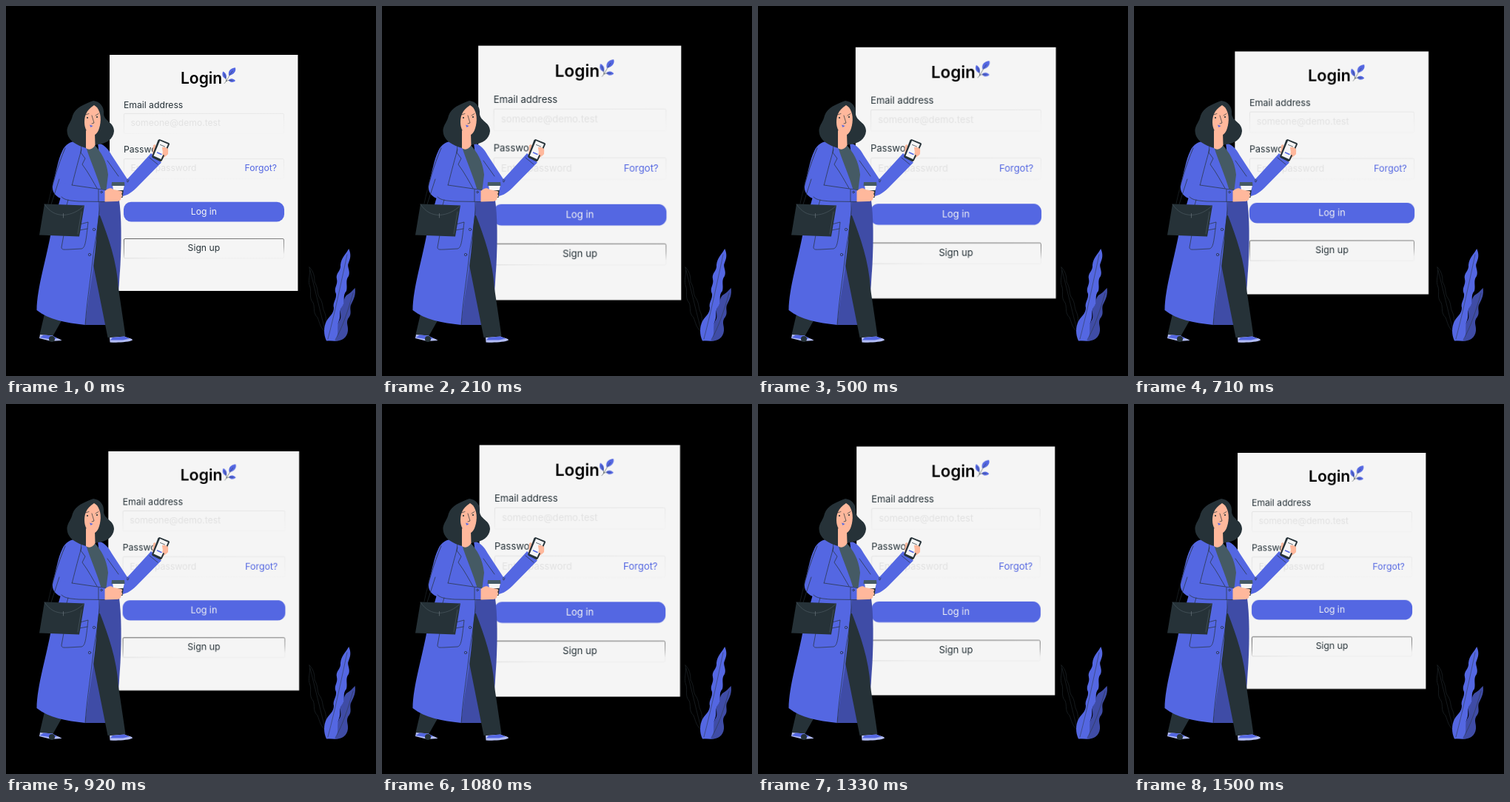
An HTML page for the animation above (1540 ms loop, 500 by 500 pixels).

```html
<!DOCTYPE html>
<html lang="en">
<head>
<meta charset="utf-8">
<title>Login card</title>
<style>
  html, body { margin: 0; width: 100%; height: 100%; overflow: hidden; background: #000; }
  svg { display: block; width: 100vw; height: 100vh; }

  .card { transform-origin: 267.2px 225.4px; animation: beat 1.54s linear infinite; }
  /* 1.5 s double beat, then a short rest */
  @keyframes beat {
    0%     { transform: scale(1); }
    18%    { transform: scale(1.102); }
    57.2%  { transform: scale(1); }
    76.9%  { transform: scale(1.1); }
    97.4%, 100% { transform: scale(1); }
  }

  text { font: 12.2px Inter, "Open Sans", sans-serif; fill: #263238; }
  .title { font-size: 21px; font-weight: 600; fill: #000; }
  .hint { font-size: 12.1px; fill: #e2e2e2; }
  .mid { text-anchor: middle; }
  .blue { fill: #5467e2; }
  .deep { fill: #3f4ca6; }
  .dark { fill: #263238; }
  .skin { fill: #ffb89c; }
  .shirt { fill: #455a64; }
  .pale { fill: #b3bdf4; }
  .white { fill: #f5f5f5; }
  .line { fill: none; stroke: #263238; stroke-width: .7; stroke-linecap: round; stroke-linejoin: round; }
  .thin { stroke-width: .5; }
  .dim { stroke: #20282c; }
</style>
</head>
<body>
<svg viewBox="0 0 500 500">
  <defs>
    <linearGradient id="edge" x1="0" y1="0" x2=".3" y2="1">
      <stop offset="0" stop-color="#555"/>
      <stop offset=".65" stop-color="#999"/>
      <stop offset="1" stop-color="#eee"/>
    </linearGradient>
    <linearGradient id="soft" x1="0" y1="0" x2=".4" y2="1">
      <stop offset="0" stop-color="#e0e0e0"/>
      <stop offset="1" stop-color="#f2f2f2"/>
    </linearGradient>
  </defs>

  <g class="card">
    <rect class="white" x="140" y="66" width="254.4" height="319"/>

    <text class="title" x="236" y="105">Login</text>
    <g class="blue">
      <path d="M301.2 94C299.6 88 303 84 309.8 83.2C311.6 88 307.6 93 301.2 94Z"/>
      <path d="M297.4 98.6C292.6 97 291.4 92.6 293.2 88.6C297.4 90.4 298.8 94.6 297.4 98.6Z"/>
      <path d="M300.6 100.4C303 97.4 307 97.4 310 101C306.6 104 302.6 103.4 300.6 100.4Z"/>
    </g>
    <path class="line thin" d="M295.2 104.6C298.4 101.4 299.6 97 306 88M295 92C296.4 96 297 98 297.8 101.4M297.6 101.6C300 100.2 303 100.2 306 100.8"/>

    <text x="159" y="138">Email address</text>
    <rect x="159.4" y="145.4" width="216" height="27" rx="1.5" fill="none" stroke="url(#soft)" stroke-width=".8"/>
    <text class="hint" x="168.5" y="162.5">someone@demo.test</text>

    <text x="159" y="198.5">Password</text>
    <rect x="159.4" y="206.6" width="216" height="27" rx="1.5" fill="none" stroke="url(#soft)" stroke-width=".8"/>
    <text class="hint" x="168.5" y="223.5">Enter password</text>
    <text class="blue" x="322.5" y="223.5">Forgot?</text>

    <rect class="blue" x="159" y="264.7" width="217" height="26.8" rx="10"/>
    <text class="white mid" x="267.4" y="281.8">Log in</text>

    <rect x="159.4" y="314.5" width="216" height="26.4" rx="1.5" fill="none" stroke="url(#edge)" stroke-width=".9"/>
    <text class="mid" x="267.4" y="331.4">Sign up</text>
  </g>

  <g id="plants">
    <path class="line dim" d="M410 353C416 359 417 366 417 373C422 381 420 387 423 393C429 401 427 407 430 413C434 421 432 430 432 441C424 434 424 428 421 421C414 414 418 408 415 401C409 394 413 387 411 380C407 371 412 364 410 353ZM411 357L431 438"/>
    <path class="deep" d="M471.6 381C473 390 470 396 467 402C463 408 468 414 464 420C458 427 463 432 462 439C461 448 454 453 444 453L436 452C441 440 447 434 450 426C455 420 450 414 453 407C458 402 455 396 460 391C465 388 468 385 471.6 381Z"/>
    <path class="blue" d="M463.2 328C467 336 465 342 463 347C460 352 466 358 463 365C458 371 462 378 460 385C454 392 459 398 455 405C449 412 453 418 450 425C446 434 451 442 445 452L433 452.6C429 444 429 434 433 426C436 420 443 416 443 408C441 401 447 396 446 389C442 381 449 377 447 369C445 361 453 358 452 350C453 340 459 336 463.2 328Z"/>
    <path class="line thin" d="M461 336C454 368 446 408 435 450M469 388C462 412 455 434 445 451"/>
  </g>

  <g id="woman">
    <!-- legs and shoes -->
    <path class="deep" d="M121 262L152.5 259C156.5 285 156 320 154.5 350L152 388L136 431L107 431Z"/>
    <path class="dark" d="M53 412L78 420L63 446.500L45.500 444Z"/>
    <path class="dark" d="M118 285L127 283C138 312 150 345 152 382L161.500 446L137.500 448L117 345Z"/>
    <path class="pale" d="M46 444L63 445.500C68 449 73 449.500 75.500 452L61 453L45 449Z"/>
    <path class="blue" d="M51 444.600L63 445.500L69 449L64 451L45.500 448Z"/>
    <circle class="dark" cx="62" cy="450" r="4"/>
    <path class="pale" d="M140 448L160 446.500C165 449 171 449 171 451.600C166 454.600 150 455 140.500 454.400Z"/>
    <path class="blue" d="M144 448L160 446.500L167 449.400L158 451.600L141 451.600Z"/>

    <!-- far arm -->
    <path class="blue" d="M124 185C133 187 138 193 143 202L164 234L196 199L210 211.500L176 246C168 254 161 257 153 258L132 252Z"/>
    <path class="line" d="M137 209L152 230M164 234C163 240 165 239 166 235M194 205L205 214"/>

    <!-- shirt and coat -->
    <path class="shirt" d="M108 193L120 188C128 197 136 209 138 228L135 252L124 252L106 210Z"/>
    <path class="blue" d="M94 183L108 190C113 207 124 231 129 250L123 300C121 345 112 385 107 431C80 428 58 424 41.500 411C42 380 54 345 62 300L74 258C65 256 62 250 63 241C68 224 70 208 76 196C80 187 87 183 94 183Z"/>
    <path class="line" d="M102 188L101 198L107 206L103 214C112 226 118 238 124 248M102 194C96 215 92 231 89 243M126 265C127 295 119 320 117 345C113 378 109 402 107 431"/>
    <path class="blue" d="M69 236L89 242L134 248L134.500 264.500L88 263.500C72 261 63 257 63 243Z"/>
    <path class="line" d="M89 242L134 248.500M75 258C80 263 88 263 98 264L134 264.500M125 248L125 264M81 293L75 326C75 330 79 329 84 329L102 328C107 327 108 319 111 292L100 295M99 303L110 301"/>
    <g class="line"><circle cx="129" cy="251.500" r="1.300"/><circle cx="119" cy="302" r="1.700"/><circle cx="113" cy="336" r="1.700"/></g>

    <!-- head -->
    <path class="dark" d="M118 128C127 129 133 136 132 146C133 156 146 157 146 169C145 180 136 186 124 187L108 192C92 187 82 180 82.500 167C84 159 88 157 90 148C94 137 105 133 118 128Z"/>
    <path class="skin" d="M108 168L120 172L120.500 188C117 194 112 195 108 192Z"/>
    <path class="skin" d="M119 134C125 137 129 146 127.500 158C126 169 122 175 117 174.500C110 173 106 166 106 157C106 149 108 141 119 134Z"/>
    <path class="line" d="M116 148L119 158L116 159M107.500 147L112 145.500M121 148L125 145.500"/>
    <circle class="dark" cx="110" cy="151" r="1.100"/>
    <circle class="dark" cx="123" cy="150" r="1.100"/>
    <path class="blue" d="M113 160.500L117.500 162L114.500 164Z"/>

    <!-- bag -->
    <path class="line dim" d="M80 192C70 215 63 240 57 267"/>
    <path class="line" d="M72 234L61 268M84 262L82 269"/>
    <path class="dark" d="M52 267.500L106 269.500L99 311.500L45 309.500Z"/>
    <path class="line" style="stroke:#4b5961" d="M52 268C60 279 67 282 77 282.500C89 282 98 277 105.500 270M102 278L97 308"/>
    <path class="line" style="stroke:#69757b" d="M77.500 280.500L77.500 286"/>

    <!-- cup and near hand -->
    <path class="dark" d="M145 247L159 247L157.500 259L146 259Z"/>
    <path class="white" d="M144 242L160 242L158.500 249L145 249Z"/>
    <path class="shirt" d="M143 238L160 238L160.500 243L142.500 243Z"/>
    <path class="skin" d="M133.500 250C138 246 142 245 145 248L156 250C158 251 157 253 156 254C158 256 157 258 155.500 259C156 262 153 264 149 264L133.500 264.500Z"/>

    <!-- phone and far hand -->
    <path class="skin" d="M199 188L202 187L203 197L209 190L217 191C220 193 219 196 219 200C216 204 213 203 210 210L198 202Z"/>
    <path class="dark" d="M207.500 180L220 185C221.500 186 221 187 220.500 188L211 208.500C210 210 209 210.500 208 210L198 205C197 204 197 203 197.500 202L205.500 181Z"/>
    <path class="white" d="M208 182L219 186.700L209.500 207L199.500 202.500Z"/>
    <path class="line" d="M208.500 187.500L214.500 190"/>
    <path class="line" style="stroke:#5467e2;stroke-width:1.500" d="M204.500 198L210 200.500"/>
    <path class="skin" d="M211 191C214 190 218 191 219 194L218.500 200C216 203 213 202 211 200C213 198 211 195 211 191Z"/>
  </g>
</svg>
</body>
</html>
```
